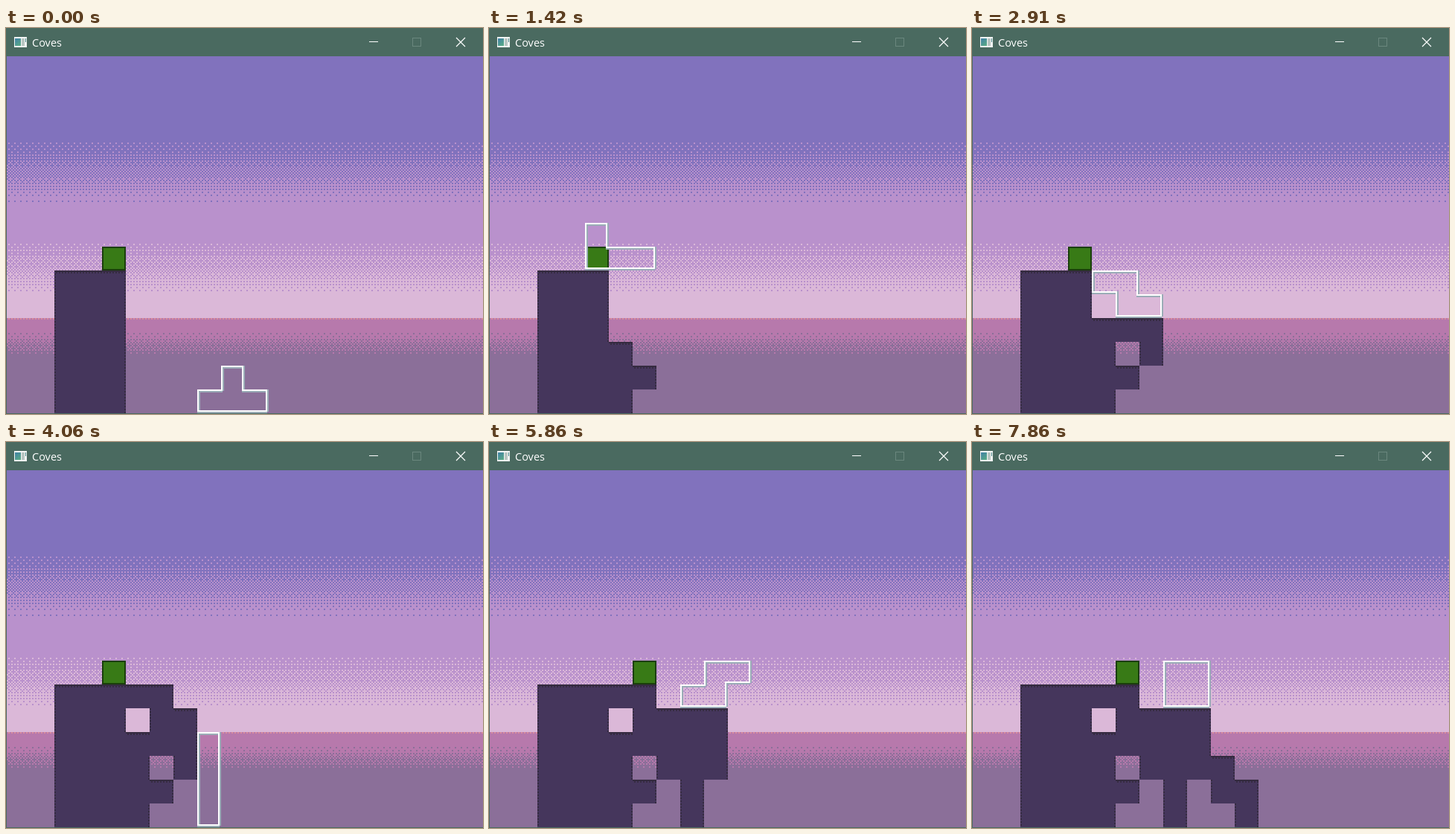
Recreate the animation shown at these times as an HTML page with a canvas. Size 641 by 519 pixels, loop 8000 ms.

```html
<!DOCTYPE html>
<html lang="en">
<head>
<meta charset="utf-8">
<title>Coves</title>
<style>
  html, body { margin: 0; width: 100%; height: 100%; overflow: hidden; background: #4a6a60; }
  canvas { display: block; }
</style>
</head>
<body>
<canvas id="stage" width="641" height="519"></canvas>
<script>
const LOOP = 8000, LEFT = 1, TOP = 38, CELL = 32, DOT = 2, ROWS = 15;
const PER_CELL = CELL / DOT;
const ctx = document.getElementById('stage').getContext('2d');

// Cells relative to the piece's pivot, in order of appearance.
const PIECES = [
  [[0, -1], [-1, 0], [0, 0], [1, 0]],
  [[-1, -1], [-1, 0], [0, 0], [1, 0]],
  [[-1, -1], [0, -1], [0, 0], [1, 0]],
  [[0, -1], [0, 0], [0, 1], [0, 2]],
  [[1, -1], [-1, 0], [0, 0], [1, 0]],
  [[0, -1], [1, -1], [-1, 0], [0, 0]],
  [[-1, -1], [0, -1], [-1, 0], [0, 0]],
];

const MOVES = [
  [70, 'left'], [350, 'left'], [590, 'turn'], [880, 'left'], [1140, 'left'], [1420, 'place'],
  [1750, 'right'], [2120, 'turn'], [2490, 'turn'], [2910, 'place'],
  [3600, 'place'],
  [3830, 'right'], [4060, 'right'], [4430, 'place'],
  [4640, 'walk'], [4850, 'turn'], [5130, 'turn'], [5410, 'turn'], [5560, 'right'],
  [5700, 'walk'], [5860, 'place'],
  [6240, 'right'], [6320, 'turn'], [6790, 'left'], [7020, 'right'], [7360, 'place'],
  [7860, 'left'],
];

const key = (x, y) => x + ',' + y;

function newGame() {
  const solid = new Set();
  for (let x = 2; x < 5; x++) for (let y = 9; y < ROWS; y++) solid.add(key(x, y));
  return { solid, player: 4, column: 9, next: 1, shape: PIECES[0] };
}

// The piece always rests on whatever lies below its column.
function restingCells({ solid, shape, column }) {
  const at = row => shape.map(([x, y]) => [x + column, y + row]);
  const free = cells => cells.every(([x, y]) => y < ROWS && !solid.has(key(x, y)));
  let row = 0;
  while (free(at(row + 1))) row++;
  return at(row);
}

const actions = {
  left: game => game.column--,
  right: game => game.column++,
  walk: game => game.player++,
  turn: game => game.shape = game.shape.map(([x, y]) => [-y, x]),
  place: game => {
    restingCells(game).forEach(([x, y]) => game.solid.add(key(x, y)));
    game.shape = PIECES[game.next++];
  },
};

function rect(c, color, x, y, w, h) {
  c.fillStyle = color;
  c.fillRect(x, y, w, h);
}

// Fills a block measured in art dots inside the playfield.
function dots(c, color, x, y, w = 1, h = 1) {
  rect(c, color, LEFT + x * DOT, TOP + y * DOT, w * DOT, h * DOT);
}

// Blends into a new color over the given dot rows, then fills down to the bottom.
function ditherBand(c, color, start, end) {
  const bayer = [0, 8, 2, 10, 12, 4, 14, 6, 3, 11, 1, 9, 15, 7, 13, 5];
  for (let y = start; y < end; y++) {
    const level = 16 * (y - start + 1) / (end - start + 1);
    for (let x = 0; x < 320; x++) {
      if (level > bayer[(y + 2) % 4 * 4 + (x + 3) % 4]) dots(c, color, x, y);
    }
  }
  dots(c, color, 0, end, 320, 240 - end);
}

function drawTitleBar(c) {
  rect(c, '#4a6a60', 0, 0, 641, 519);
  rect(c, '#f4f6f5', 11, 12, 17, 14);
  const pane = c.createLinearGradient(12, 14, 20, 24);
  pane.addColorStop(0, '#3f7fa6');
  pane.addColorStop(1, '#5cae84');
  rect(c, pane, 12, 14, 8, 10);
  rect(c, '#b9c6c2', 21, 14, 4, 10);
  rect(c, '#4a8a8c', 26, 14, 1, 5);

  c.fillStyle = '#fff';
  c.font = '14.5px "Open Sans", "Noto Sans", sans-serif';
  c.fillText('Coves', 35, 25);

  rect(c, '#fff', 488, 18, 12, 1);
  c.strokeStyle = '#6a877e';
  c.strokeRect(546.5, 13.5, 11, 11);
  c.strokeStyle = '#fff';
  c.lineWidth = 1.2;
  c.beginPath();
  c.moveTo(605, 13); c.lineTo(617, 25);
  c.moveTo(617, 13); c.lineTo(605, 25);
  c.stroke();
}

function makeBackdrop() {
  const canvas = document.createElement('canvas');
  canvas.width = 641;
  canvas.height = 519;
  const c = canvas.getContext('2d');
  drawTitleBar(c);
  dots(c, '#8172bd', 0, 0, 320, 240);
  ditherBand(c, '#b991cc', 58, 100);
  ditherBand(c, '#dbb8d8', 126, 163);
  dots(c, '#b779ac', 0, 176, 320, 64);
  for (let x = 1; x < 320; x += 2) dots(c, '#d98c9c', x, 176);
  ditherBand(c, '#8b6f99', 186, 202);
  return canvas;
}

// Open sides get a checkered rim, open tops a full line above it.
function drawGround(solid) {
  const edge = '#352b40', last = PER_CELL - 1;
  for (const cell of solid) {
    const [x, y] = cell.split(',').map(Number);
    const px = x * PER_CELL, py = y * PER_CELL;
    const open = (dx, dy) => !solid.has(key(x + dx, y + dy));
    const checker = (dx, dy) => {
      if ((dx + dy) % 2 === 0) dots(ctx, edge, px + dx, py + dy);
    };
    dots(ctx, '#45365c', px, py, PER_CELL, PER_CELL);
    if (open(0, -1)) dots(ctx, edge, px, py, PER_CELL, 1);
    for (let i = 0; i < PER_CELL; i++) {
      if (open(0, -1)) checker(i, 1);
      if (open(-1, 0)) checker(0, i);
      if (open(1, 0)) checker(last, i);
    }
  }
}

function drawPlayer(column) {
  const x = LEFT + column * CELL, y = TOP + 8 * CELL;
  rect(ctx, '#1b3f0c', x, y, CELL, CELL);
  rect(ctx, '#387a16', x + 2, y + 2, CELL - 4, CELL - 4);
}

// White outline with a shadow one dot to the right and below, both kept inside the cells.
function drawOutline(cells) {
  const taken = new Set(cells.map(([x, y]) => key(x, y)));
  const inCell = (x, y) => taken.has(key(Math.floor(x / PER_CELL), Math.floor(y / PER_CELL)));
  const inBody = (x, y) =>
    inCell(x, y) && inCell(x + 1, y) && inCell(x, y + 1) && inCell(x + 1, y + 1);
  const near = [-1, 0, 1];
  const onLine = (x, y) =>
    inBody(x, y) && near.some(dx => near.some(dy => !inBody(x + dx, y + dy)));

  for (const [cx, cy] of cells) {
    for (let i = 0; i < PER_CELL * PER_CELL; i++) {
      const x = cx * PER_CELL + i % PER_CELL;
      const y = cy * PER_CELL + Math.floor(i / PER_CELL);
      if (onLine(x, y)) dots(ctx, '#fff', x, y);
      else if (onLine(x - 1, y) || onLine(x, y - 1)) dots(ctx, '#9badb7', x, y);
    }
  }
}

const backdrop = makeBackdrop();
let shown = -1;

function draw(time) {
  const done = MOVES.filter(([at]) => at <= time);
  if (done.length === shown) return;
  shown = done.length;
  const game = newGame();
  done.forEach(([, move]) => actions[move](game));
  ctx.drawImage(backdrop, 0, 0);
  drawGround(game.solid);
  drawPlayer(game.player);
  drawOutline(restingCells(game));
}

const origin = performance.now();
function tick() {
  draw((performance.now() - origin) % LOOP);
  requestAnimationFrame(tick);
}
tick();
</script>
</body>
</html>
```
